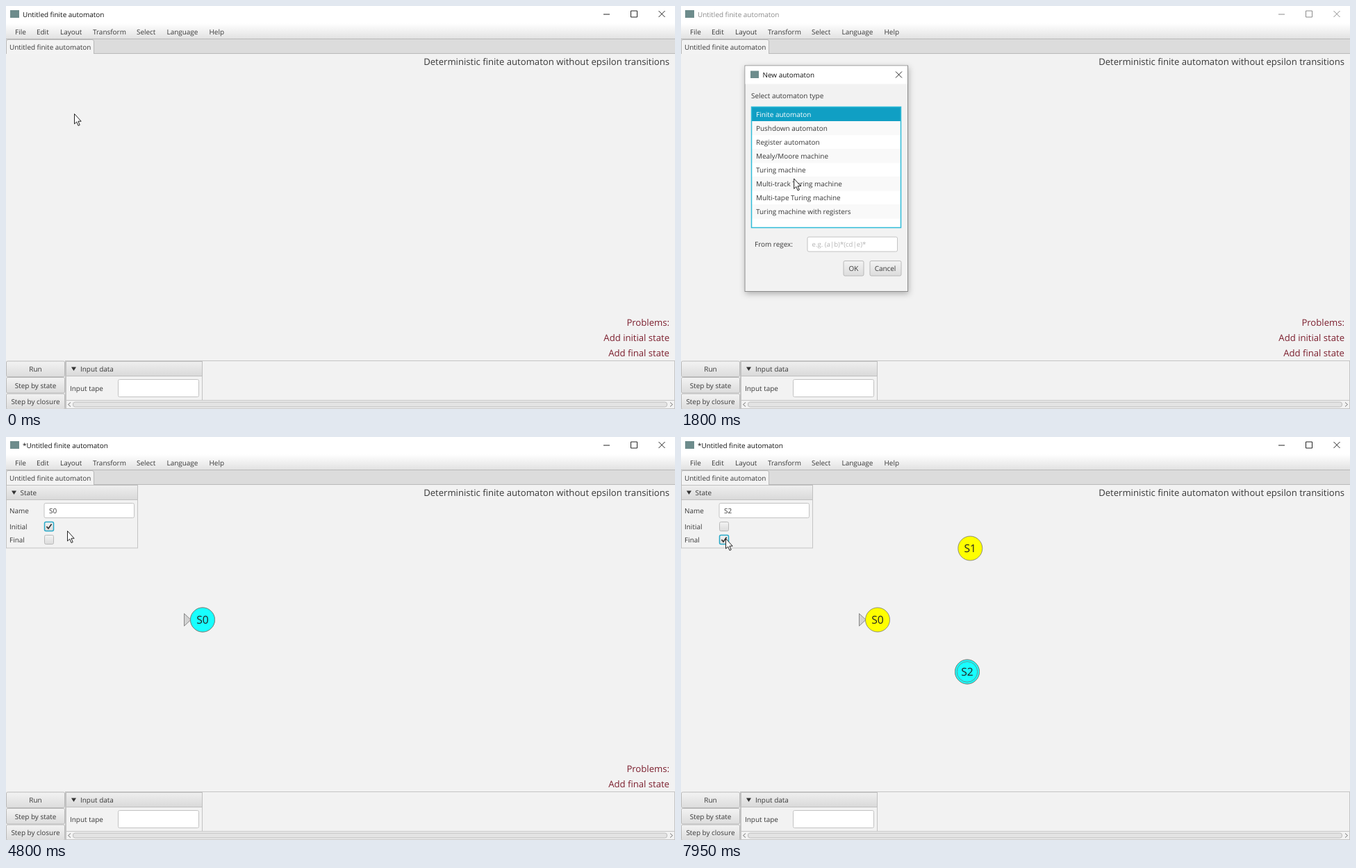
Animation of 963x581 px, one loop 8000 ms. Source, as an HTML page:

```html
<!DOCTYPE html>
<html lang="en">
<head>
<meta charset="utf-8">
<title>Automaton editor</title>
<style>
  html, body { margin: 0; width: 100%; height: 100%; overflow: hidden; background: #f2f2f2; }
  svg { display: block; width: 963px; height: 581px; }
  text { font: 9.95px "Open Sans", "Noto Sans", sans-serif; fill: #383838; text-rendering: geometricPrecision; white-space: pre; }
  .title { fill: #111; }
  .dim { fill: #8a8a8a; }
  .big { font-size: 13.13px; text-anchor: end; }
  .problem { fill: #7c1f2e; }
  .mid { text-anchor: middle; }
  .prompt { font-size: 9.6px; fill: #b4b4b4; }
  .line { fill: none; stroke: #c4c4c4; }
  .panel { fill: #f2f2f2; stroke: #c4c4c4; }
  .head { fill: url(#headFill); stroke: #c0c0c0; }
  .button { fill: url(#buttonFill); stroke: #b9b9b9; }
  .field { fill: #fff; stroke: #c3c3c3; }
  .focus { stroke: #27a9c8; stroke-width: 1.5; }
  .pressed { fill: #cfd3d5; }
  .icon { fill: #6d8c8c; }
  .controls { fill: none; stroke: #222; }
  .controls.faded { stroke: #8a8a8a; }
  .state circle { fill: #ff0; stroke: #777; stroke-width: .8; }
  .state .selected { fill: #18ffff; }
  .state .ring { fill: none; }
  .state text { font-size: 15.6px; text-anchor: middle; fill: #222; }
  .check { fill: none; stroke: #333; stroke-width: 1.7; }
</style>
</head>
<body>
<svg viewBox="0 0 963 581">
  <defs>
    <linearGradient id="menuFill" x2="0" y2="1"><stop stop-color="#fff"/><stop offset="1" stop-color="#e2e2e2"/></linearGradient>
    <linearGradient id="headFill" x2="0" y2="1"><stop stop-color="#efefef"/><stop offset="1" stop-color="#d9d9d9"/></linearGradient>
    <linearGradient id="buttonFill" x2="0" y2="1"><stop stop-color="#f3f3f3"/><stop offset="1" stop-color="#dcdcdc"/></linearGradient>
    <filter id="shadow" x="-10%" y="-10%" width="120%" height="120%">
      <feDropShadow dx="1" dy="3" stdDeviation="4" flood-opacity=".28"/>
    </filter>
    <g id="box"><rect class="button" x=".5" y=".5" width="13" height="13" rx="2"/></g>
    <g id="tick">
      <rect class="button focus" x=".5" y=".5" width="13" height="13" rx="2"/>
      <path class="check" d="M3.4 7.2 6 10 10.6 3.6"/>
    </g>
    <path id="windowControls" d="M860 12h9M899.5 7h9v9h-9zM939.5 7l9 9m0-9-9 9"/>
  </defs>

  <rect width="963" height="581" fill="#f2f2f2"/>
  <rect width="963" height="25" fill="#fff"/>
  <rect class="icon" x="6" y="6" width="13" height="11"/>
  <text class="title" x="24" y="16" data-show="0 1250 2450 3700">Untitled finite automaton</text>
  <text class="dim" x="24" y="16" data-show="1250 2450">Untitled finite automaton</text>
  <text class="title" x="24" y="16" data-show="3700 8000">*Untitled finite automaton</text>
  <use href="#windowControls" class="controls" data-show="0 1250 2450 8000"/>
  <use href="#windowControls" class="controls faded" data-show="1250 2450"/>

  <rect y="25" width="963" height="22" fill="url(#menuFill)"/>
  <g id="menu"></g>

  <rect y="47" width="963" height="22" fill="#dcdcdc"/>
  <path class="line" d="M0 47.5H963M126 68.5H963" style="stroke:#b9b9b9"/>
  <path d="M.5 69V51q0-2.500 2.500-2.500H124q2.500 0 2.500 2.500V69" fill="#f3f3f3" stroke="#b9b9b9"/>
  <text x="5" y="63">Untitled finite automaton</text>

  <text class="big" x="955" y="84.500">Deterministic finite automaton without epsilon transitions</text>
  <g data-show="0 2450 2600 4500">
    <text class="big problem" x="955" y="461">Problems:</text>
    <text class="big problem" x="955" y="483">Add initial state</text>
  </g>
  <text class="big problem" x="955" y="483" data-show="4500 7700">Problems:</text>
  <text class="big problem" x="955" y="505" data-show="0 2450 2600 7700">Add final state</text>

  <rect class="panel" x="85.500" y="511.500" width="877" height="69"/>
  <g id="buttons"></g>
  <rect class="panel" x="86.500" y="512.500" width="196" height="56"/>
  <rect class="head" x="86.500" y="512.500" width="196" height="21"/>
  <path d="M94 520.500h7l-3.500 5.500z" fill="#333"/>
  <text x="107" y="527">Input data</text>
  <text x="92" y="555">Input tape</text>
  <rect class="field" x="161.500" y="538.500" width="116" height="25" rx="2"/>
  <rect class="line" x="86.500" y="568.500" width="876" height="12"/>
  <rect x="96.500" y="571" width="855" height="7" rx="3" fill="#e3e3e3" stroke="#bdbdbd"/>
  <path d="M93 571.500 89.500 574.500 93 577.500M956 571.500l3.500 3-3.500 3" fill="none" stroke="#777"/>

  <g data-show="3700 8000">
    <rect class="panel" x=".5" y="69.500" width="189" height="90.500"/>
    <rect class="head" x=".5" y="69.500" width="189" height="21"/>
    <path d="M8 77.500h7l-3.500 5.500z" fill="#333"/>
    <text x="20.500" y="84">State</text>
    <text x="5" y="110">Name</text>
    <text x="5" y="132.500">Initial</text>
    <text x="5" y="152">Final</text>
    <rect class="field" x="55" y="95.500" width="129.500" height="21" rx="2"/>
    <text x="62" y="110" data-show="3700 5700">S0</text>
    <text x="62" y="110" data-show="5700 6450">S1</text>
    <text x="62" y="110" data-show="6450 8000">S2</text>
    <use href="#box" x="55" y="122"/>
    <use href="#box" x="55" y="141"/>
    <use href="#tick" x="55" y="122" data-show="4500 5700"/>
    <use href="#tick" x="55" y="141" data-show="7700 8000"/>
  </g>

  <path d="M256.500 254.500v18l9.500-9z" fill="#d2d2d2" stroke="#888" data-show="4500 8000"/>
  <g id="states"></g>

  <g id="dialog">
    <rect x="92" y="86" width="234.500" height="325.500" fill="#f2f2f2" stroke="#8c8c8c" filter="url(#shadow)"/>
    <rect x="92.500" y="86.500" width="233.500" height="26" fill="#fff"/>
    <rect class="icon" x="100" y="93.500" width="12" height="10.500"/>
    <g data-show="0 2450">
      <text class="title" x="117.500" y="103">New automaton</text>
      <path class="controls" d="M309 94.500l9 9m0-9-9 9"/>
    </g>
    <text class="dim" x="117.500" y="103" data-show="2450 8000">New automaton</text>
    <text x="101" y="132.500">Select automaton type</text>
    <g id="rows"></g>
    <rect class="line" x="101.500" y="145.500" width="215" height="174"/>
    <rect x="101.500" y="145.500" width="215" height="174" fill="none" stroke="#30bcd8" stroke-width="1.500" data-show="0 2400"/>
    <text x="106" y="347">From regex:</text>
    <rect class="field" x="182" y="333" width="129.500" height="21" rx="2"/>
    <text class="prompt" x="188.500" y="347">e.g. (a|b)*(cd|e)*</text>
    <rect class="button" x="234" y="367.500" width="29" height="21.500" rx="2"/>
    <rect class="focus pressed" x="234.500" y="367.500" width="28.500" height="21.500" rx="2" data-show="2400 8000"/>
    <text class="mid" x="248.500" y="382">OK</text>
    <rect class="button" x="272" y="367.500" width="45" height="21.500" rx="2"/>
    <text class="mid" x="294" y="382">Cancel</text>
  </g>

  <path id="cursor" d="M.5.5V15L3.700 12 6 17.500 8.200 16.500 5.900 11.200H10.200Z" fill="#fff" stroke="#222"/>
</svg>
<script>
const LOOP = 8000, STEP = 50;
const $ = id => document.getElementById(id);

const menu = { File: 13, Edit: 44, Layout: 78, Transform: 125, Select: 188, Language: 231.5, Help: 292.5 };
$('menu').innerHTML = Object.entries(menu)
  .map(([label, x]) => `<text x="${x}" y="40.500">${label}</text>`).join('');

$('buttons').innerHTML = ['Run', 'Step by state', 'Step by closure'].map((label, i) => {
  const y = 512 + i * 23.5;
  return `<rect class="button" x=".5" y="${y}" width="84" height="22.500" rx="2"/>
    <text class="mid" x="42.500" y="${y + 15}">${label}</text>`;
}).join('');

const types = ['Finite automaton', 'Pushdown automaton', 'Register automaton', 'Mealy/Moore machine',
  'Turing machine', 'Multi-track Turing machine', 'Multi-tape Turing machine', 'Turing machine with registers', ''];
$('rows').innerHTML = types.map((label, i) => {
  const y = 146 + i * 20.05, height = i < 8 ? 20.05 : 13;
  const row = fill => `<rect x="102" y="${y}" width="214.500" height="${height}" fill="${fill}"/>`;
  const name = (style = '') => `<text x="108" y="${y + 13.7}" style="${style}">${label}</text>`;
  return i ? row(i % 2 ? '#f9f9f9' : '#fff') + name()
    : row('#d0d0d0') + name() + `<g data-show="0 2400">${row('#109fc4')}${name('fill:#fff')}</g>`;
}).join('');

// name, centre, time created, time deselected, time made final
const states = [
  ['S0', 283, 263.5, 3700, 5700],
  ['S1', 416.3, 160.5, 5700, 6450],
  ['S2', 412, 338.5, 6450, LOOP, 7700],
];
$('states').innerHTML = states.map(([name, x, y, made, left, final]) =>
  `<g class="state" transform="translate(${x} ${y})" data-show="${made} ${LOOP}">
    <circle r="17.500"/><circle class="selected" r="17.500" data-show="${made} ${left}"/>
    ${final ? `<circle class="ring" r="14.800" data-show="${final} ${LOOP}"/>` : ''}
    <text y="5.500">${name}</text></g>`).join('');

const timed = [...document.querySelectorAll('[data-show]')]
  .map(el => ({ el, times: el.dataset.show.split(' ').map(Number) }));

// time, x, y
const path = [
  [0, 98, 155], [700, 21, 37], [900, 21, 37], [1150, 34, 58], [1350, 34, 58],
  [2150, 250, 379], [2500, 252, 381], [2750, 252, 381], [3400, 283, 263], [3700, 283, 263],
  [3800, 300, 276], [4350, 62, 128], [4550, 62, 128], [4800, 88, 135], [5500, 416, 160],
  [5750, 416, 160], [6000, 415, 211], [6300, 412, 339], [6550, 412, 339],
  [7250, 170, 190], [7600, 64, 146], [LOOP, 64, 146],
];

const clamp = v => Math.min(1, Math.max(0, v));
const progress = (t, from, to) => clamp((t - from) / (to - from));
const smooth = p => p * p * (3 - 2 * p);

function moveCursor(t) {
  const i = path.findIndex(p => p[0] > t);
  const [from, x, y] = path[i - 1], [to, x2, y2] = path[i];
  const p = smooth(progress(t, from, to));
  $('cursor').setAttribute('transform', `translate(${x + (x2 - x) * p} ${y + (y2 - y) * p})`);
}

function drawDialog(t) {
  const open = 1 - (1 - progress(t, 1200, 1420)) ** 2;
  const close = progress(t, 2500, 2700);
  const scale = 0.95 + 0.05 * open - 0.05 * close;
  $('dialog').style.opacity = open * (1 - close);
  $('dialog').setAttribute('transform', `translate(92 86) scale(${scale}) translate(-92 -86)`);
}

function draw(t) {
  for (const { el, times } of timed)
    el.style.display = times.filter(v => v <= t).length % 2 ? '' : 'none';
  moveCursor(t);
  drawDialog(t);
}

const start = performance.now();
function tick() {
  const t = (performance.now() - start) % LOOP;
  draw(Math.floor(t / STEP) * STEP);
  requestAnimationFrame(tick);
}
tick();
</script>
</body>
</html>
```
